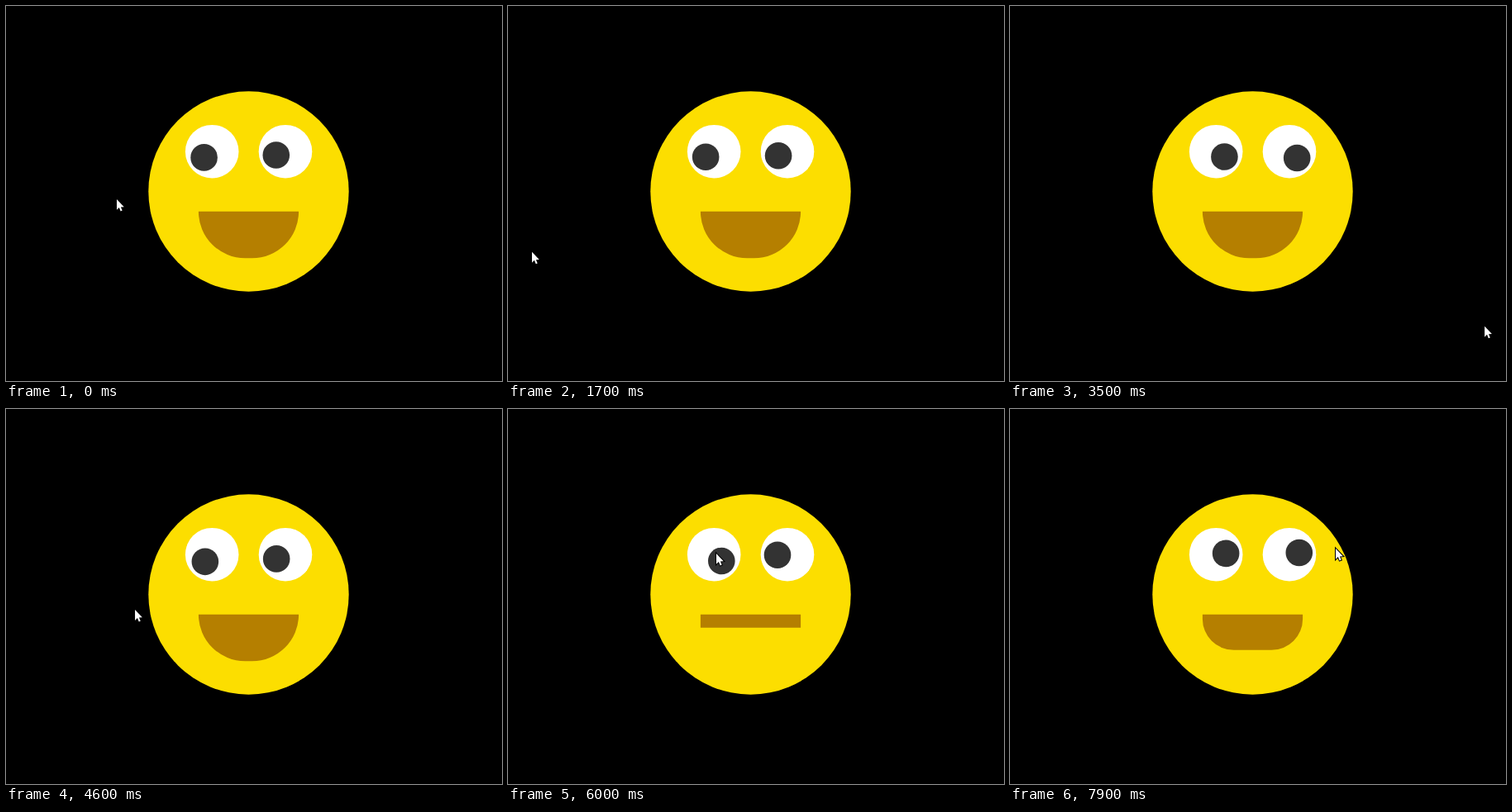
An HTML page for the animation above (8 s loop, 600 by 454 pixels).

```html
<!DOCTYPE html>
<html lang="en">
<head>
<meta charset="utf-8">
<title>Watching face</title>
<style>
html, body { margin: 0; width: 100%; height: 100%; overflow: hidden; background: #000; }
svg { display: block; width: 600px; height: 454px; }
</style>
</head>
<body>
<svg viewBox="0 0 600 454">
  <circle cx="293.5" cy="224.5" r="121.2" fill="#fcde00"/>
  <path id="mouth" fill="#b57f00"/>
  <g fill="#fff">
    <circle cx="249.2" cy="176.2" r="32.3"/>
    <circle cx="338" cy="176.2" r="32.3"/>
  </g>
  <g fill="#333">
    <circle class="pupil" r="16.3"/>
    <circle class="pupil" r="16.3"/>
  </g>
  <path id="cursor" d="M0 0V12.8L2.9 10 4.7 14.4 6.7 13.6 4.9 9.4 8.8 9.2Z"
    fill="#fff" stroke="#000" stroke-width="2" paint-order="stroke"/>
</svg>
<script>
const LOOP = 8000, STEP = 100;
const FACE = { x: 293.5, y: 224.5, r: 121.2 };
const EYE = { xs: [249.2, 338], y: 176.2, r: 32.3, reach: 12, bias: -0.04, lag: 0.06 };
const MOUTH = { x: 232.9, y: 248.8, width: 121.2, shut: 16, open: 56.5, steps: 3 };

// Cursor sweeps around the face: step, degrees clockwise from the right, distance
const sweeps = [
  [0, 176.6, 159.8], [3, 195, 255], [9, 389, 175], [17, 164.5, 274.5], [18, 164.5, 274.5],
  [27, 72, 149], [35, 30.2, 324.7], [39, 105, 161], [44, 209, 179], [46, 172.3, 138.7],
  [51, 37.6, 83], [54, 37.6, 83], [58, 169, 56.5], [60, 230, 64.6],
  [72, -188.8, 107.8], [76, -158, 92], [77, -120, 132], [79, -28.9, 114.8]
];

const mouth = document.getElementById('mouth');
const cursor = document.getElementById('cursor');
const pupils = document.querySelectorAll('.pupil');

const mix = (a, b, p) => a + (b - a) * p;

function orbit(t) {
  t = Math.max(t, 0);
  const i = Math.max(1, sweeps.findIndex(s => s[0] >= t));
  const [t0, a0, r0] = sweeps[i - 1], [t1, a1, r1] = sweeps[i];
  const p = (t - t0) / (t1 - t0);
  return { angle: mix(a0, a1, p) * Math.PI / 180, dist: mix(r0, r1, p) };
}

function cursorAt(t) {
  const { angle, dist } = orbit(t);
  return [FACE.x + dist * Math.cos(angle), FACE.y + dist * Math.sin(angle)];
}

// The mouth closes while the cursor is on the face, over a few steps.
function openness(t) {
  let outside = 0;
  for (let i = 0; i < MOUTH.steps; i++) outside += orbit(t - i).dist > FACE.r;
  return outside / MOUTH.steps;
}

// The aim point drifts up and left as the eye's bounding box grows with rotation.
function gaze(cx, x, y) {
  let angle = Math.atan2(y - EYE.y, x - cx);
  for (let i = 0; i < 4; i++) {
    const shift = EYE.r * (Math.abs(Math.cos(angle)) + Math.abs(Math.sin(angle)) - 1);
    angle = Math.atan2(y - EYE.y + shift, x - cx + shift);
  }
  angle += EYE.bias;
  return [cx + EYE.reach * Math.cos(angle), EYE.y + EYE.reach * Math.sin(angle)];
}

function draw(now) {
  const t = Math.floor((now % LOOP) / STEP);
  const [x, y] = cursorAt(t);
  cursor.setAttribute('transform', `translate(${x} ${y})`);

  const aim = cursorAt(t - EYE.lag);
  pupils.forEach((pupil, i) => {
    const [px, py] = gaze(EYE.xs[i], ...aim);
    pupil.setAttribute('cx', px);
    pupil.setAttribute('cy', py);
  });

  const p = openness(t), h = mix(MOUTH.shut, MOUTH.open, p), r = MOUTH.open * p;
  mouth.setAttribute('d', `M${MOUTH.x} ${MOUTH.y}h${MOUTH.width}v${h - r}` +
    `a${r} ${r} 0 0 1 ${-r} ${r}h${2 * r - MOUTH.width}a${r} ${r} 0 0 1 ${-r} ${-r}z`);
}

const start = performance.now();
function tick() {
  draw(performance.now() - start);
  requestAnimationFrame(tick);
}
tick();
</script>
</body>
</html>
```
